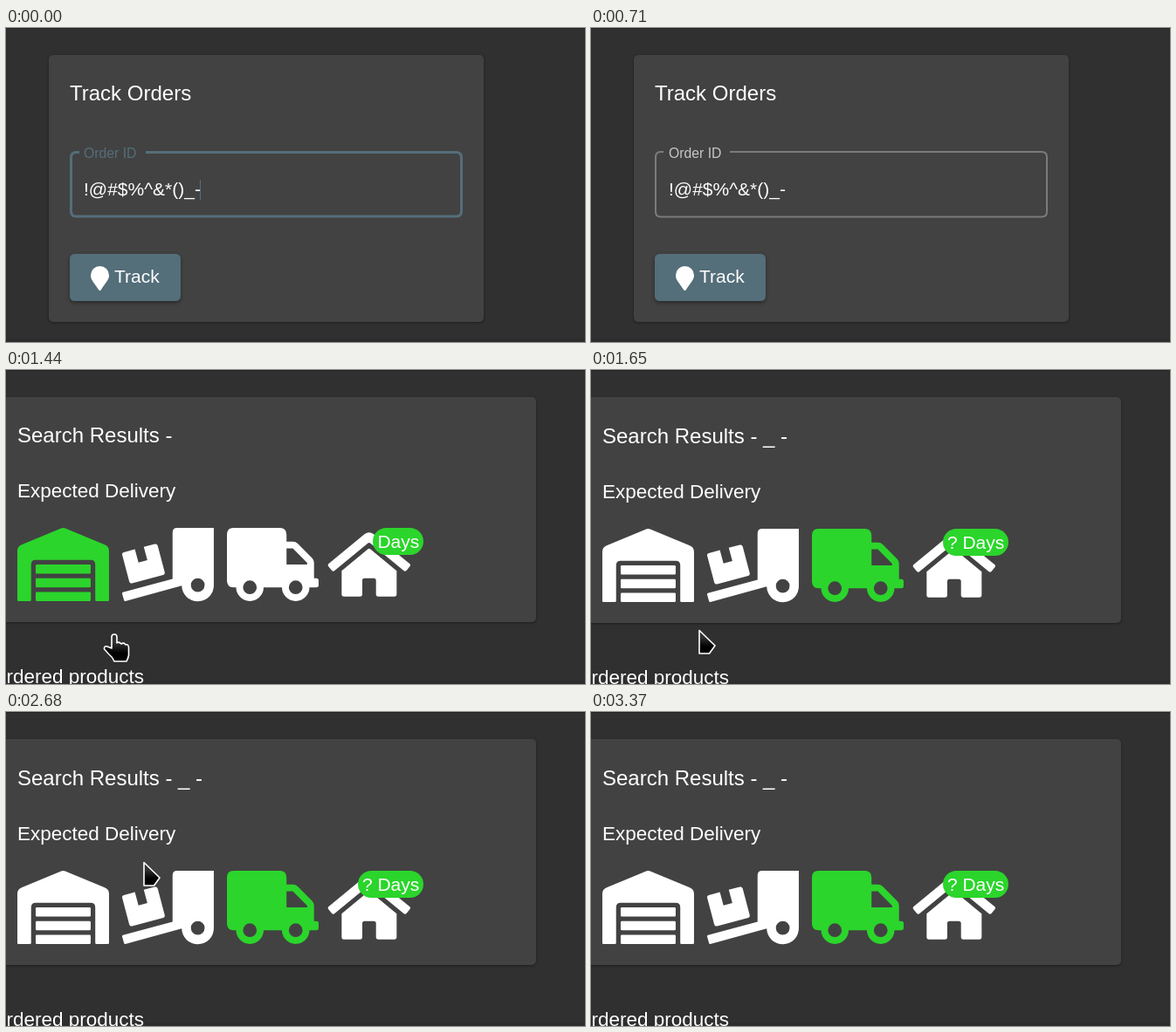
An HTML page for the animation above (4.97 s loop, 663 by 360 pixels).

```html
<!DOCTYPE html>
<html lang="en">
<head>
<meta charset="utf-8">
<title>Track Orders</title>
<style>
  html, body { margin: 0; width: 100%; height: 100%; overflow: hidden; background: #303030; }
  svg { display: block; font: 21px "Liberation Sans", Arial, sans-serif; fill: #fff; }
  .title { font-size: 24px; }
  .head { font-size: 22.5px; }
  .card { fill: #424242; filter: drop-shadow(0 1.5px 1.5px rgba(0, 0, 0, .4)); }
  .icon { fill-rule: evenodd; }
  .outline { fill: none; }
  .cursor { stroke: #fff; stroke-width: 1.6; stroke-linejoin: round; }
</style>
</head>
<body>
<svg width="663" height="360" viewBox="0 0 663 360">
  <defs>
    <linearGradient id="ink" x2="0" y2="1">
      <stop offset=".3" stop-color="#333"/>
      <stop offset=".7" stop-color="#000"/>
    </linearGradient>
  </defs>
  <rect width="663" height="360" fill="#303030"/>
  <rect width="663" height="1" fill="#232323"/>
  <rect y="356" width="663" height="4" fill="#2d2d2d"/>

  <g id="form">
    <rect class="card" x="49" y="31" width="498" height="306" rx="5"/>
    <text class="title" x="73" y="83">Track Orders</text>
    <path id="outline" class="outline"/>
    <text id="label" x="89" y="149" font-size="15.75">Order ID</text>
    <text x="89" y="192">!@#$%^&amp;*()_-</text>
    <rect id="caret" x="222" y="174" width="1" height="23" fill="#546e7a"/>
    <rect id="button" x="73" y="259" width="127" height="54" rx="5.5" fill="#546e7a"/>
    <rect id="glow" x="73" y="259" width="127" height="54" rx="5.5"/>
    <path transform="translate(97 273) scale(.0547)" d="M172 502C27 291 0 269 0 192a192 192 0 0 1 384 0C384 269 357 291 212 502Q192 522 172 502Z"/>
    <text x="124" y="292">Track</text>
  </g>

  <g id="results">
    <rect id="panel" class="card" x="-30" y="31" width="637" height="258" rx="5"/>
    <g id="content">
      <text class="title" id="heading" x="13" y="83"></text>
      <text class="head" x="13" y="146">Expected Delivery</text>
      <g class="icon" id="warehouse" transform="translate(13 181) scale(.164)">
        <path d="M0 161Q0 129 30 117L302 4Q320-3 338 4L610 117Q640 129 640 161V504q0 8-8 8h-80q-8 0-8-8V256q0-32-32-32H128q-32 0-32 32V504q0 8-8 8H8q-8 0-8-8Z"/>
        <rect x="128" y="256" width="384" height="64" rx="8"/>
        <rect x="128" y="352" width="384" height="64" rx="8"/>
        <rect x="128" y="448" width="384" height="64" rx="8"/>
      </g>
      <g class="icon" transform="translate(133 181) scale(.164)">
        <path d="M50 376q5 15 20 11l216-58q15-5 11-20L248 124q-5-15-20-11L151 133l25 93-62 16-25-92-77 20Q-4 175 1 190Z"/>
        <path d="M384 0q-32 0-32 32V356L6 450q-8 3-6 10l13 46q3 8 10 6L416 404A112 112 0 0 0 640 400V0ZM480 400a48 48 0 0 1 96 0a48 48 0 0 1-96 0Z"/>
      </g>
      <path class="icon" id="truck" transform="translate(253 181) scale(.164)" d="M624 352h-16V244q0-20-14-34L494 110q-14-14-34-14H416V48q0-48-48-48H48Q0 0 0 48V368q0 48 48 48H64a96 96 0 0 0 192 0H384a96 96 0 0 0 192 0h48q16 0 16-16v-32q0-16-16-16ZM112 416a48 48 0 0 1 96 0a48 48 0 0 1-96 0ZM432 416a48 48 0 0 1 96 0a48 48 0 0 1-96 0ZM560 256H416V144h44L560 244Z"/>
      <g class="icon" transform="translate(368.6 181) scale(.164)">
        <path d="M280 148L96 300V464q0 16 16 16H224q16 0 16-16V368q0-16 16-16h64q16 0 16 16v96q0 16 16 16H464q16 0 16-16V300L296 148q-8-6-16 0Z"/>
        <path d="M572 251L488 183V44q0-12-12-12h-56q-12 0-12 12v73L318 43q-30-22-61 0L4 251q-8 8-1 17l25 31q8 8 17 2L280 107q8-6 16 0L531 301q9 6 17-2l25-31q7-9-1-17Z"/>
      </g>
      <rect id="badge" y="181" height="31" rx="15.5" fill="#2bd52b"/>
      <text id="days" x="473.3" y="204" text-anchor="end"></text>
      <text class="head" x="-17" y="359">Ordered products</text>
    </g>
  </g>

  <path id="hand" class="cursor" fill="url(#ink)" transform="translate(111 302)" d="M10 17V4Q10 1 13 1T16 4V11Q18 9 21 12Q24 10 26 13Q29 12 29.500 16V25Q29 28 27 32H13Q11 27 6 23L1.500 18Q1 14 5 15Z"/>
  <path id="arrow" class="cursor" fill="url(#ink)" d="M1 1.500L19 19L12.500 28H1Z"/>
  <path id="beam" class="cursor" fill="none" d="M-5-12Q0-12 0-8V8Q0 12-5 12M5-12Q0-12 0-8V8Q0 12 5 12"/>
</svg>
<script>
const $ = id => document.getElementById(id);
const set = (id, attrs) => { for (const k in attrs) $(id).setAttribute(k, attrs[k]); };
const show = (id, on) => set(id, { visibility: on ? "visible" : "hidden" });
const clamp = v => Math.min(1, Math.max(0, v));
const GREEN = "#2bd52b", LOOP = 4970;

// Pointer path: time, x, y
const path = [
  [2350, 123, 297], [2680, 157, 171], [2840, 187, 139],
  [3130, 187, 139], [3330, 361, 284]
];

// Rounded field border with a notch for the label
function outline(w, gap) {
  const l = 73 + w / 2, r = 523 - w / 2, t = 141 + w / 2, b = 217.5 - w / 2, c = 6;
  return `M${gap} ${t}H${l + c}Q${l} ${t} ${l} ${t + c}V${b - c}Q${l} ${b} ${l + c} ${b}` +
    `H${r - c}Q${r} ${b} ${r} ${b - c}V${t + c}Q${r} ${t} ${r - c} ${t}H${gap + 76}`;
}

function pointer(t) {
  if (t < 2390) return path[0].slice(1);
  const start = t < 3170 ? 2680 : 3170;
  t = start + Math.floor((t - start) / 40) * 40;
  let i = 0;
  while (i < path.length - 2 && t >= path[i + 1][0]) i++;
  const [t0, x0, y0] = path[i], [t1, x1, y1] = path[i + 1];
  const k = clamp((t - t0) / (t1 - t0));
  return [x0 + (x1 - x0) * k, y0 + (y1 - y0) * k];
}

function drawForm(t) {
  const focused = t < 710, hover = clamp((t - 750) / 300);
  set("outline", {
    d: focused ? outline(3, 84) : outline(2, 83),
    stroke: focused ? "#546e7a" : "#7b7b7b",
    "stroke-width": focused ? 3 : 2
  });
  set("label", { fill: focused ? "#546e7a" : "#c6c6c6" });
  show("caret", t < 220);
  set("glow", { "fill-opacity": hover * .1 });
  $("button").style.filter =
    `drop-shadow(0 ${2 + 2 * hover}px ${2 + 2 * hover}px rgba(0,0,0,.4))`;
}

function drawResults(t) {
  const loaded = t >= 1610;
  set("panel", { height: loaded ? 259 : 258 });
  set("content", { transform: `translate(0 ${+loaded})` });
  $("heading").textContent = "Search Results -" + (loaded ? " _ -" : "");
  $("days").textContent = loaded ? "? Days" : "Days";
  set("badge", { x: loaded ? 403 : 420, width: loaded ? 75 : 58 });
  set("warehouse", { fill: loaded ? "#fff" : GREEN });
  set("truck", { fill: loaded ? GREEN : "#fff" });
}

function drawCursor(t) {
  const [x, y] = pointer(t), moving = t >= 1650 && t < 3370;
  const overText = x < 194 && y > 126 && y < 152;
  show("hand", t >= 750 && t < 1650);
  show("arrow", moving && !overText);
  show("beam", moving && overText);
  for (const id of ["arrow", "beam"]) set(id, { transform: `translate(${x} ${y})` });
}

function frame(now) {
  const t = now % LOOP, searching = t < 1440;
  $("form").style.display = searching ? "" : "none";
  $("results").style.display = searching ? "none" : "";
  if (searching) drawForm(t); else drawResults(t);
  drawCursor(t);
  requestAnimationFrame(frame);
}

const begin = performance.now();
const tick = frame;
frame = now => tick(Math.max(0, now - begin));
requestAnimationFrame(frame);
</script>
</body>
</html>
```
